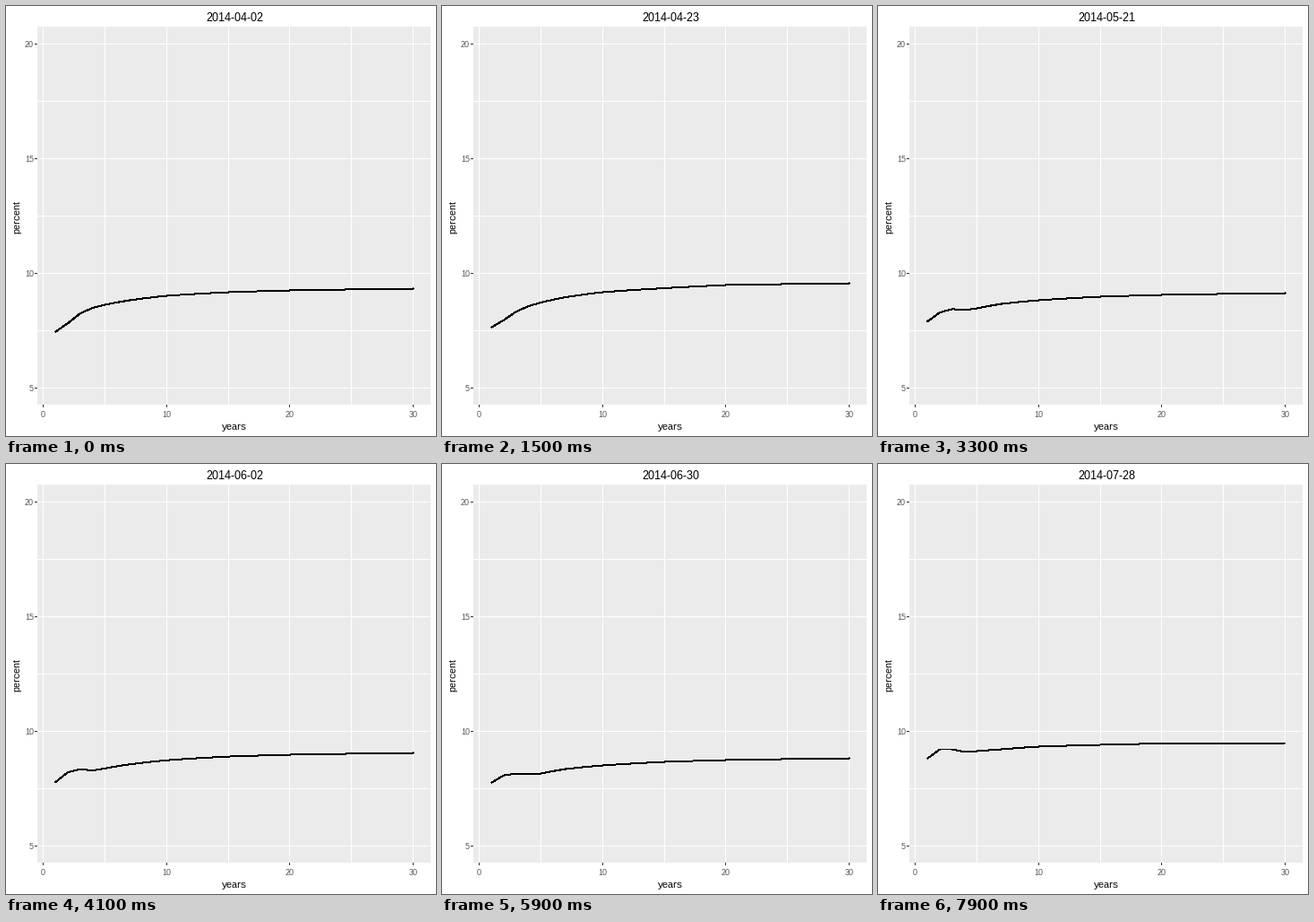
A matplotlib script that plays this animation: 480x480 px, repeating every 8000 ms.

```python
import matplotlib.pyplot as plt
import numpy as np
from matplotlib.animation import FuncAnimation
from matplotlib.patches import Rectangle

SIZE, FRAMES, STEP_MS = 480, 80, 100
PX = 0.72  # points per pixel at 100 dpi

plt.rcParams.update({
    "font.family": "Liberation Sans",
    "text.hinting": "native",
    "text.hinting_factor": 1,
})

fig = plt.figure(figsize=(4.8, 4.8), dpi=100, facecolor="white")
ax = fig.add_axes([0, 0, 1, 1])
ax.set(xlim=(0, SIZE), ylim=(SIZE, 0))
ax.axis("off")


def x_pos(years):
    return 41.7 + 13.76 * np.asarray(years)


def y_pos(percent):
    return 42.5 + 25.6 * (20 - percent)


def box(x, y, w, h, color):
    ax.add_patch(Rectangle((x, y), w, h, fc=color, lw=0, antialiased=False))


def label(x, y, text, size, color="black", **kw):
    return ax.text(x, y, text, fontsize=size * PX, color=color,
                   **{"ha": "center", "va": "baseline", **kw})


# Panel, grid, ticks and labels
box(35, 23, 439, 422, "#ebebeb")
for year in range(0, 31, 5):
    x = int(x_pos(year))
    box(x, 23, 1, 422, "white")
    if year % 10 == 0:
        box(x, 445, 1, 3, "#333333")
        label(x + 0.5, 459, str(year), 9, "#4d4d4d")
for percent in np.arange(5, 20.1, 2.5):
    y = int(y_pos(percent))
    box(35, y, 439, 1, "white")
    if percent % 5 == 0:
        box(32, y, 3, 1, "#333333")
        label(31, y + 4, f"{percent:.0f}", 9, "#4d4d4d", ha="right")

label(255, 473, "years", 11)
label(17, 235, "percent", 11, rotation=90, va="center", ha="right")
title = label(255, 17, "", 13)

# Trading days: weekdays without the public holidays
HOLIDAYS = ["2014-05-01", "2014-05-09", "2014-06-12", "2014-06-13"]
days = np.busday_offset("2014-04-02", np.arange(FRAMES), holidays=HOLIDAYS)

# Yield curve heights in pixels at a few maturities, on a few days
TENORS = [1, 2, 3, 4, 5, 7, 10, 15, 20, 30]
CURVES = {
    0: [363.5, 354, 343, 337, 333.5, 328.5, 323.5, 319.5, 317.5, 315.5],
    15: [358.5, 350.5, 341, 335, 331, 325, 319.5, 315, 311.5, 309.5],
    33: [352, 342, 338.3, 339.5, 337.5, 332.5, 328.5, 324.5, 322.5, 320.5],
    49: [353.5, 342.5, 340.5, 342.5, 340.5, 337, 332.5, 328.5, 326.5, 324.5],
    59: [355.5, 347.5, 345.5, 346.5, 345.5, 340.5, 336.5, 332.5, 330.5, 328.5],
    71: [345.5, 338.5, 338.5, 339.5, 338.5, 334.5, 330.5, 327, 325.5, 323.5],
    79: [328.5, 318.5, 318.5, 321.5, 320.5, 318.5, 315.5, 313.5, 312, 311.5],
}
KEYS = list(CURVES)
HEIGHTS = np.array(list(CURVES.values()))

# Short-end swings on top, fading with maturity
SWING_DAYS = [0, 4, 9, 15, 18, 27, 33, 40, 49, 57, 59, 63, 71, 72, 79]
SWINGS = [0, 4.5, 2.5, 0, 0, -1, 0, 2.5, 0, 1, 0, 1, 0, -1, 0]

YEARS = np.arange(1, 31)
FADE = np.exp(-(YEARS - 1) / 4)

curve, = ax.plot([], [], color="black", lw=PX, antialiased=False, snap=False)


def update(i):
    knots = [np.interp(i, KEYS, col) for col in HEIGHTS.T]
    y = np.interp(np.log(YEARS), np.log(TENORS), knots)
    curve.set_data(x_pos(YEARS), y + FADE * np.interp(i, SWING_DAYS, SWINGS))
    title.set_text(str(days[i]))
    return curve, title


anim = FuncAnimation(fig, update, frames=FRAMES, interval=STEP_MS,
                     repeat=True, repeat_delay=0)
plt.show()
```
